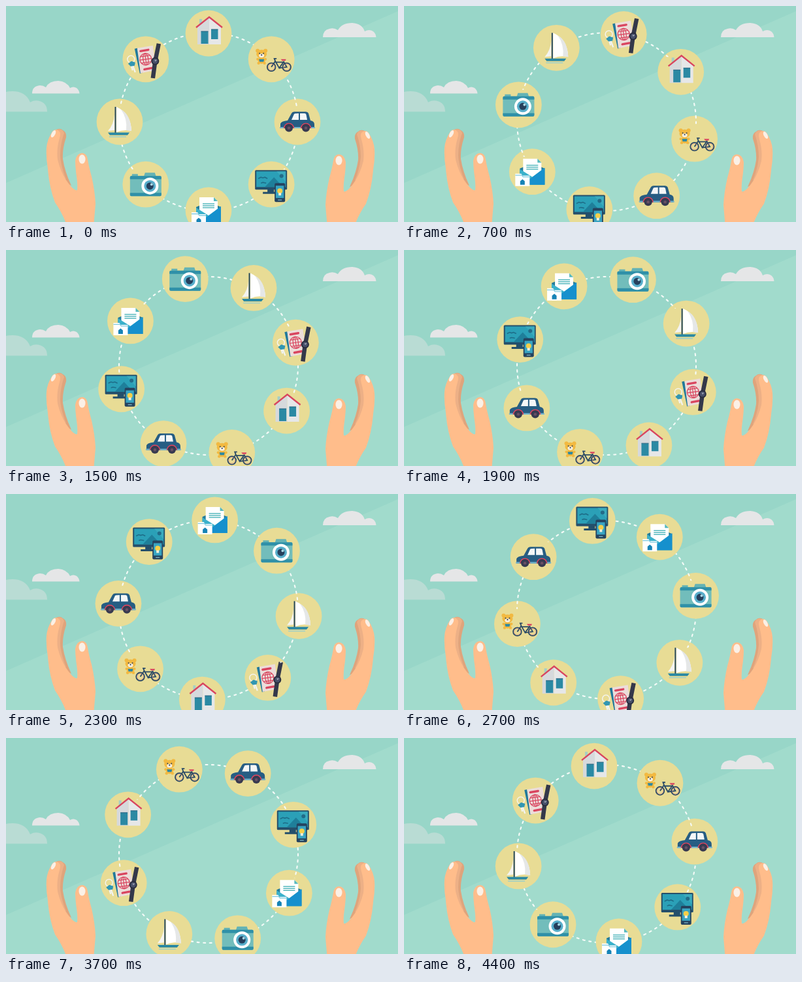
Animation of 600x332 px, one loop 4.5 s. Source, as an HTML page:

```html
<!DOCTYPE html>
<html lang="en">
<head>
<meta charset="utf-8">
<title>Belongings in a ring</title>
<style>
  html, body { margin: 0; width: 100%; height: 100%; overflow: hidden; background: #a1dbcc; }
  svg { display: block; width: 600px; height: 332px; }
</style>
</head>
<body>
<svg viewBox="0 0 600 332" xmlns="http://www.w3.org/2000/svg">
  <defs>
    <clipPath id="caps"></clipPath>

    <g id="house">
      <path d="M-14-22h4v11h-4z" fill="#a5cfc6"/>
      <path d="M-17-10L1-24V17H-17z" fill="#d6d9dc"/>
      <path d="M1-24L19-10V17H1z" fill="#e6e7e8"/>
      <path d="M-19-9L1-25L21-9" fill="none" stroke="#d9455f" stroke-width="2.4"/>
      <path d="M-11.500-3h11v19h-11zM4-6h10.500v15H4z" fill="#2b89a3"/>
      <path d="M-11.500-3h11M4-6h10.500" stroke="#23607f" stroke-width="1"/>
    </g>

    <g id="toys" fill="none">
      <g fill="#f2b941">
        <circle cx="-21" cy="-13" r="3"/><circle cx="-9" cy="-13" r="3"/>
        <ellipse cx="-15" cy="-8" rx="8" ry="6.500"/>
        <ellipse cx="-15" cy="2" rx="5.500" ry="5"/>
        <circle cx="-21" cy="0" r="2"/><circle cx="-9" cy="0" r="2"/>
        <circle cx="-19.500" cy="6" r="2.200"/><circle cx="-10.500" cy="6" r="2.200"/>
      </g>
      <path d="M-19 0h8l-1 4h-6z" fill="#2b89a3"/>
      <ellipse cx="-15" cy="-5.500" rx="4" ry="3" fill="#f7efdf"/>
      <g fill="#33455c"><circle cx="-18" cy="-9" r="1"/><circle cx="-12" cy="-9" r="1"/><circle cx="-15" cy="-6.500" r="1.100"/></g>
      <g stroke="#2a4a66" stroke-width="1.800">
        <circle cx="0" cy="12" r="6.300"/><circle cx="23.500" cy="12" r="6.300"/>
        <path d="M0 12L6 3L12 13.500L18.500 4.500H6M12 13.500L23.500 12L18.500 3M6 3L4.500-1H8"/>
      </g>
      <g stroke="#d98d85" stroke-width=".7"><circle cx="0" cy="12" r="4.800"/><circle cx="23.500" cy="12" r="4.800"/></g>
      <path d="M14.500 0h8l-1 2.500h-5z" fill="#d9455f"/>
    </g>

    <g id="car">
      <path d="M-26 10V3Q-25-1-15-2L-9-13Q-8-15.500-5-15.500H13Q16-15.500 17-13L20-2Q26-1 26 4V10z" fill="#265d83"/>
      <path d="M-9-3L-5-12Q-4-13 2-13V-3zM4-13H11Q13-13 13.500-11L15-3H4z" fill="#f4f7f8"/>
      <path d="M-27 9H27" stroke="#75b6cd" stroke-width="2.200"/>
      <path d="M-20.500 10a7.500 7.500 0 0 1 15 0M5.500 10a7.500 7.500 0 0 1 15 0" fill="#2a3a52" stroke="#d9455f" stroke-width="1.600"/>
      <g fill="#383a50"><circle cx="-13" cy="9.500" r="6"/><circle cx="13" cy="9.500" r="6"/></g>
      <g fill="#695064"><circle cx="-13" cy="9.500" r="2.300"/><circle cx="13" cy="9.500" r="2.300"/></g>
    </g>

    <g id="screens">
      <path d="M-6 6H4V12H-6zM-13 11.500H10V14.500H-13z" fill="#244f6b"/>
      <rect x="-25" y="-22" width="49" height="30" rx="1.500" fill="#244f6b"/>
      <path d="M-23-20H22V4H-23z" fill="#2ba0b7"/>
      <path d="M-10 4L4-11L18 4z" fill="#1f7f9a"/>
      <path d="M22-20V-4L8-20z" fill="#3aaabd"/>
      <circle cx="15.500" cy="-13" r="3" fill="#226b88"/>
      <path d="M-20-9l4-2 3 1 3-1 4 2M-16-2l3-1 5 1" fill="none" stroke="#1e6d88" stroke-width="1.600"/>
      <rect x="5" y="-2" width="16" height="29" rx="2" fill="#25435f"/>
      <path d="M6.800 2H19.200V21H6.800z" fill="#38a4c2"/>
      <circle cx="13" cy="10" r="4" fill="#f5cf4a"/>
      <path d="M11 13h4v4h-4z" fill="#f3f0df"/>
      <path d="M10 24h6" stroke="#84bccb" stroke-width="1.200"/>
    </g>

    <g id="mail">
      <path d="M-19-5L0-13L19-5V20H-19z" fill="#247b99"/>
      <path d="M-14-20H8L14-14V12H-14z" fill="#fff"/>
      <path d="M8-20V-14H14z" fill="#55b8bd"/>
      <path d="M-9-10H9M-9-7H9M-9-4H9" stroke="#55b8bd" stroke-width="1.500"/>
      <path d="M-19-4L0 8L19-6V20H-19z" fill="#3bb1cb"/>
      <path d="M19-6V20H-17L2 7z" fill="#1690cd"/>
      <path d="M-26 3H-17L-15 6H-4V22H-26z" fill="#fff"/>
      <path d="M-26 5.500H-16L-14 8H-4" fill="none" stroke="#7ec9e0" stroke-width="1.300"/>
      <path d="M-18.500 20V14.500L-15 11.500L-11.500 14.500V20z" fill="#1683b6"/>
    </g>

    <g id="camera">
      <path d="M-21-16h9v4h-9zM-3-12L-1-18H14L16-12z" fill="#64b3b5"/>
      <rect x="-24" y="-13" width="48" height="31" rx="2" fill="#72bdbb"/>
      <path d="M-24-8V-11Q-24-13-22-13H22Q24-13 24-11V-8zM-24 13H24V16Q24 18 22 18H-22Q-24 18-24 16z" fill="#2f90a8"/>
      <circle cx="6.500" cy="2.500" r="13" fill="#fff"/>
      <circle cx="6.500" cy="2.500" r="9" fill="#58aecb"/>
      <circle cx="6.500" cy="2.500" r="5.500" fill="#263f5c"/>
      <circle cx="9" cy="0" r="2" fill="#a9d8e4"/>
    </g>

    <g id="boat">
      <path d="M-5-23Q17-13 18 14Q6 11-5 16z" fill="#fff"/>
      <path d="M2-19Q17-11 18 14L10 13Q12-5 2-19z" fill="#e5e7e7"/>
      <path d="M-8-11Q-9 4-18 14L-8 13z" fill="#f4f4f2"/>
      <path d="M-6.500-23V18" stroke="#294b60" stroke-width="2"/>
      <path d="M-18 16.500H15L12 20.500H-15z" fill="#2b89a3"/>
      <path d="M-16 23H10" stroke="#9ed0c8" stroke-width="1.600"/>
    </g>

    <g id="travel">
      <path d="M-20 9L-16 20M-22 10L-20 17" stroke="#f2f4f2" stroke-width="2.200"/>
      <circle cx="-22.500" cy="0" r="5.500" fill="none" stroke="#f4f4ef" stroke-width="1.500"/>
      <path d="M-27 7L-22 3L-16 5L-17 10L-23 11z" fill="#3196b2"/>
      <path d="M-17-16L-13-17L-5 21L-9 22z" fill="#21799b"/>
      <path d="M-13-17L11-21L16 17L-8 21.500z" fill="#ecdcd9"/>
      <g fill="none" stroke="#d9455f" stroke-width="1.200" transform="rotate(-8)">
        <circle r="9"/><ellipse rx="4" ry="9"/><path d="M0-9V9M-9 0H9M-7.500-5H7.500M-7.500 5H7.500"/>
      </g>
      <path d="M-8-12.500L4-14.500M-2 15.500L9 13.500" stroke="#d9455f" stroke-width="3.400" stroke-linecap="round"/>
      <path d="M20-24L14.500 3L11 29" fill="none" stroke="#34384a" stroke-width="6.500"/>
      <circle cx="14.500" cy="3" r="6" fill="#292d3e"/>
      <circle cx="14.500" cy="3" r="4" fill="#48506a"/>
      <path d="M14.500 3l2.500-2M14.500 3v-2.500" stroke="#cfd6dd" stroke-width=".8"/>
    </g>

    <g id="hand">
      <path d="M77 190Q83 187 87 191Q93 194 92 202Q86 220 87 235Q90 255 100 276L82 268L70 225z" fill="#dfa47c"/>
      <path d="M78 190Q86 188 89 195Q83 213 83 230Q84 247 92 266L80 262L68 225z" fill="#edb086"/>
      <path d="M62 218Q63 205 71 193Q76 187 82 193Q84 196 82 203Q77 220 79 236Q85 262 101 279Q106 284 109 283Q110 275 108 262Q106 248 106 238Q108 226 117 226Q124 227 125 236Q127 248 131 262Q136 284 137 304L134 340H94Q87 319 75 302Q66 278 64 250Q61 232 62 218z" fill="#ffbd8b"/>
      <ellipse cx="72.500" cy="196.500" rx="2.800" ry="6" transform="rotate(28 72.500 196.500)" fill="#fbf0e6"/>
      <ellipse cx="116.500" cy="235.500" rx="5" ry="7" fill="#fbf0e6"/>
    </g>
  </defs>

  <rect width="600" height="332" fill="#a1dbcc"/>
  <path d="M0 0H600V8L0 272z" fill="#98d6c8"/>
  <path d="M0 132Q4 131 10 131Q30 131 37 148Q43 144 51 146Q63 149 63 162.500H0z" fill="#b9dcd4"/>
  <g fill="#e5e6e7">
    <path d="M40 134.500Q40 123 52 122Q57 122 61 125Q66 115 80 115Q93 116 98 126Q103 123 108 126Q112 129 112.500 134.500z"/>
    <path d="M485 48Q485 37 495 35Q502 33 508 37Q514 26 530 26Q545 27 549 39Q556 35 562 39Q566 42 566.500 48z"/>
  </g>

  <circle class="ring" cx="310" cy="178" r="137"/>
  <g id="items"></g>
  <g clip-path="url(#caps)"><circle class="ring" cx="310" cy="178" r="137"/></g>

  <use href="#hand"/>
  <use href="#hand" transform="translate(626 2) scale(-1 1)"/>
</svg>
<script>
  const NS = 'http://www.w3.org/2000/svg';
  const LOOP = 4500, STEP = 100, CX = 310, CY = 178, DOT = 35.4, CAP = 23;
  const names = ['house', 'toys', 'car', 'screens', 'mail', 'camera', 'boat', 'travel'];

  function add(parent, tag, attrs) {
    const el = document.createElementNS(NS, tag);
    for (const key in attrs) el.setAttribute(key, attrs[key]);
    return parent.appendChild(el);
  }

  const dash = 2 * Math.PI * 137 / 90;
  document.querySelectorAll('.ring').forEach(ring => {
    ring.setAttribute('style', `fill:none;stroke:#f5fbf8;stroke-width:2.1;stroke-linecap:round;stroke-dasharray:3 ${dash - 3}`);
  });

  // The ring shows over the upper rim of each disc.
  const half = Math.sqrt(DOT * DOT - CAP * CAP);
  const capPath = `M${-half} ${-CAP}A${DOT} ${DOT} 0 0 1 ${half} ${-CAP}z`;
  const layer = document.getElementById('items');
  const caps = document.getElementById('caps');

  const items = names.map((name, i) => {
    const group = add(layer, 'g', {});
    add(group, 'circle', { r: DOT, fill: '#e8dc95' });
    add(group, 'use', { href: '#' + name });
    return { base: i * 45, parts: [group, add(caps, 'path', { d: capPath })] };
  });

  function draw(now) {
    const p = Math.floor((now % LOOP) / STEP) * STEP / LOOP;
    const radius = 136 + 2.4 * Math.sin(Math.PI * p);
    for (const { base, parts } of items) {
      const a = (base + 360 * p) * Math.PI / 180;
      const x = CX + radius * Math.sin(a), y = CY - radius * Math.cos(a);
      for (const part of parts) part.setAttribute('transform', `translate(${x.toFixed(2)} ${y.toFixed(2)})`);
    }
  }

  const start = performance.now();
  function tick() {
    draw(performance.now() - start);
    requestAnimationFrame(tick);
  }
  tick();
</script>
</body>
</html>
```
